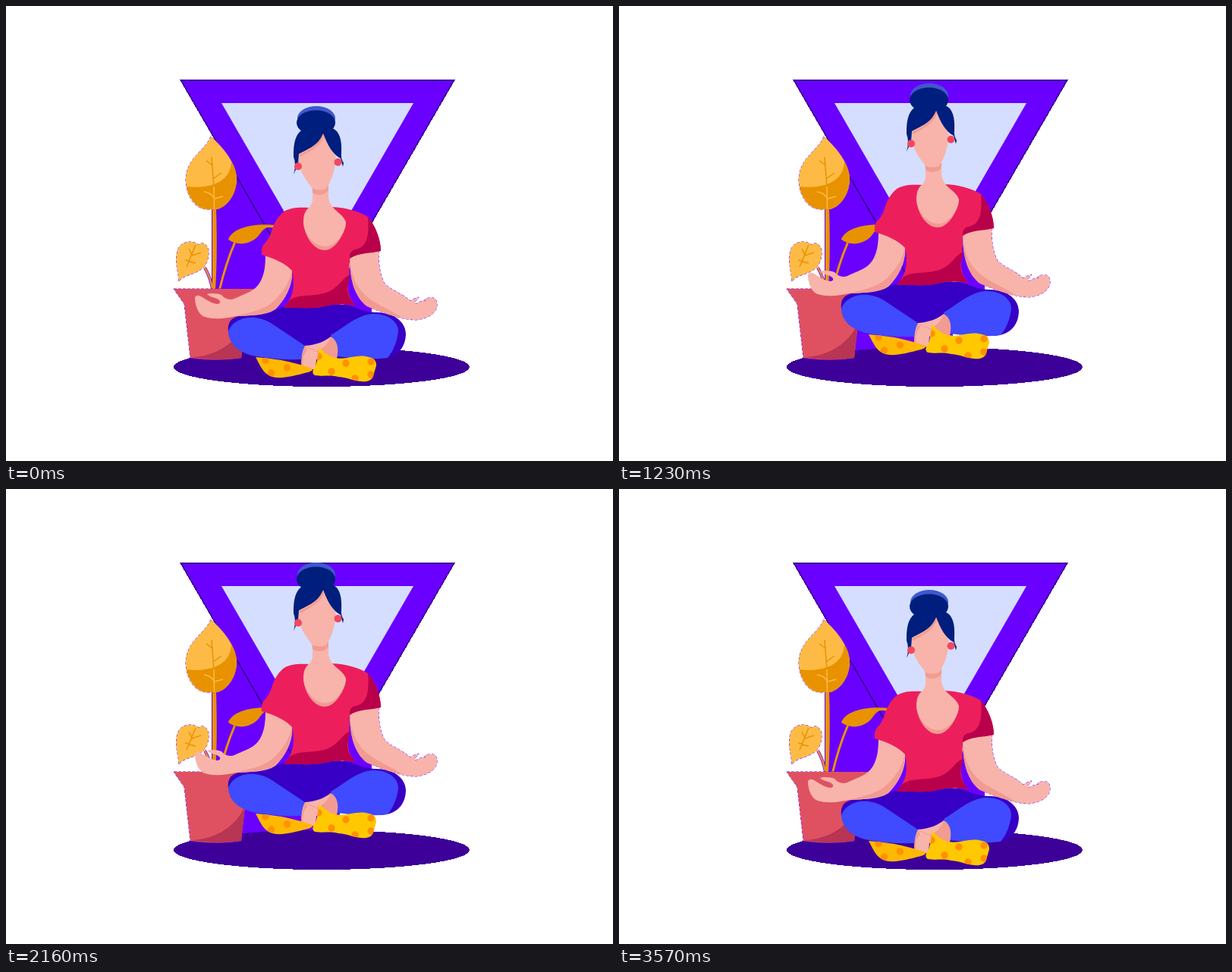
Write an HTML page that moves like this. It is 800 px wide and 600 px high and loops after 3.6 s.

```html
<!DOCTYPE html>
<html lang="en">
<head>
<meta charset="utf-8">
<title>Levitating meditation</title>
<style>
  html, body { margin: 0; width: 100%; height: 100%; overflow: hidden; background: #fff; }
  svg { display: block; width: 800px; height: 600px; }
  .purple { fill: #6a00ff; }
  .skin { fill: #f8b4aa; }
  .skin-shade { fill: #f19b91; }
  .shirt { fill: #ec1f5c; }
  .shirt-shade { fill: #b9004a; }
  .pants { fill: #3700c4; }
  .leg { fill: #404aff; }
  .hair { fill: #001e7d; }
  .gold { fill: #fdbb45; }
  .ochre { fill: #e89200; }
  .dots { fill: #ff9000; }
  .fringe { stroke: #6a00ff; stroke-width: 1; stroke-dasharray: 4 2; paint-order: stroke; }
  .line { fill: none; stroke: #e89200; stroke-width: 1.5; }
  .line.light { stroke: #fdbb45; }
</style>
</head>
<body>
<svg viewBox="0 0 800 600">
  <defs>
    <clipPath id="backSock"><path id="backSockShape" d="M329 463Q360 465 388 473L404 478Q405 481 398 483C382 487 368 491 356 490C340 488 336 476 329 463Z"/></clipPath>
    <clipPath id="frontSock"><path id="frontSockShape" d="M413 450C419 456 424 462 434 464C450 467 463 458 478 463C486 464 488 469 488 474L484 488C482 494 476 496 468 495C456 494 451 490 438 489C425 486 420 489 407 487Q403 485 405 479C411 473 410 462 413 450Z"/></clipPath>
  </defs>

  <!-- backdrop -->
  <path class="purple" d="M271 235L300 213L410 400L440 370V456H271Z"/>
  <g shape-rendering="crispEdges">
    <path class="purple" d="M230.500 98H590.500L410.500 409Z" stroke="#3a0099" stroke-width="1.700"/>
    <ellipse cx="416" cy="476" rx="195" ry="26" fill="#3d0099"/>
  </g>
  <path d="M284 128H537L410.500 347Z" fill="#d5defe"/>

  <!-- plant -->
  <path class="line" d="M262 345Q269 357 272 373" style="stroke:#6a00ff;stroke-width:4"/>
  <path class="line" d="M262 345Q269 357 272 373" style="stroke:#e8873c;stroke-width:2.500"/>
  <path class="ochre" d="M272 240H276Q279.500 320 276 374H272Z"/>
  <path class="line" d="M301.500 312Q289.500 340 281.500 374" style="stroke-width:3"/>
  <path class="ochre" d="M293 308C298 293 325 286 356 289V294C345 290 341 292 335 300C325 315 305 317 293 308Z"/>
  <path class="gold fringe" d="M270 172C263 191 237 200 237 230C238 252 250 270 269 268C289 272 305 248 304 226C302 203 282 183 270 172Z"/>
  <path class="ochre" d="M238 238C262 241 296 236 297 205Q303 214 304 226C305 248 289 272 269 268C254 270 241 254 238 238Z"/>
  <path class="line" d="M271 199L274 239M264 204L272 210M284 220L273 228"/>
  <path class="line light" d="M274 238L274.500 268M261 245Q270 246 274 253M286 251L275 254"/>
  <path class="gold fringe" d="M228 363C227 348 222 337 226 323C229 310 246 308 254 315C260 309 268 317 267 326C266 357 236 350 228 363Z"/>
  <path class="line" d="M250 315L238 344M241 320L245 328M257 325L245 329M236 335L241 336M250 339L241 337"/>
  <path class="fringe" fill="#df5161" d="M221 373H331L318 393L310 464Q278 469 243 464L235 393Z"/>
  <path fill="#b83553" d="M244 463C280 462 306 441 315 417L310 464Q278 469 244 463Z"/>

  <g id="figure">
    <!-- trousers -->
    <path class="purple" d="M448 345H456L482 398V406L445 398Z"/>
    <path class="pants" d="M293 430C291 410 304 407 330 408C352 404 360 394 380 396C405 400 430 390 452 395C464 398 471 404 490 404C514 405 527 418 527 433C526 455 511 465 492 465L430 452L394 449L330 452Z"/>
    <path class="leg" d="M293 430C298 412 325 404 349 418L394 448L389 466Q355 467 330 462C307 458 294 446 293 430Z"/>
    <path class="leg" d="M428 434C446 424 462 407 484 406C505 406 517 417 517 429C515 447 508 458 503 464C480 467 453 464 435 462Z"/>

    <!-- feet -->
    <path class="skin" d="M394 448C410 447 420 442 428 436L432 466H409L408 479H389C389 464 390 456 394 448Z"/>
    <path class="skin-shade" d="M428 436C437 441 439 451 436 465L424 464L409 456Q424 449 428 436ZM394 449Q389 460 389 478H392Q389 461 397 454Z"/>
    <path class="line" d="M394 449L413 457" style="stroke:#f19b91;stroke-width:1"/>
    <use href="#backSockShape" fill="#ffb800"/>
    <g class="dots" clip-path="url(#backSock)">
      <circle cx="342" cy="467" r="4.700"/><circle cx="349.500" cy="484" r="4.700"/><circle cx="370.500" cy="477" r="4.700"/>
    </g>
    <use href="#frontSockShape" fill="#ffc800"/>
    <g class="dots" clip-path="url(#frontSock)">
      <circle cx="412" cy="462" r="4.700"/><circle cx="448" cy="471" r="4.700"/><circle cx="429" cy="482" r="4.700"/>
      <circle cx="460" cy="491" r="4.700"/><circle cx="481" cy="469" r="4.700"/><circle cx="481" cy="486" r="4.700"/>
    </g>

    <!-- arms -->
    <path class="skin" d="M342 326L377 346C379 366 370 385 355 400C342 409 320 408 303 409C290 412 275 414 262 410C253 407 249 394 249 384Q252 380 257 383C265 388 271 392 278 393Q283 393 282 389C279 384 269 385 265 380C270 378 280 379 284 381C289 387 295 388 301 386C318 378 329 376 336 362C341 352 342 341 342 326Z"/>
    <path class="skin-shade" d="M377 349C378 370 367 389 351 402Q338 408 303 409C326 403 344 400 357 385C368 373 373 364 377 349Z"/>
    <path class="skin fringe" d="M453 330C453 362 460 384 476 396C496 404 517 413 540 414C558 412 568 404 568 394C568 387 565 384 559 385Q552 385 552 388L558 389Q549 387 540 393C537 390 542 388 544 384Q537 386 533 389C519 377 509 376 499 366C492 353 491 340 491 320Z"/>
    <path class="skin-shade" d="M453 331C455 358 463 375 482 388C496 397 511 403 523 412C506 408 490 402 476 396C460 384 453 362 453 331Z"/>

    <!-- shirt -->
    <path class="shirt" d="M400 266C386 265 375 266 368 270C360 275 355 284 352 291C348 304 345 309 339 315Q336 321 337 328C354 333 368 339 377 349C380 365 381 382 366 398C383 396 395 400 415 397C435 392 448 393 460 395C448 379 451 371 452 356L453 333C462 325 478 326 494 323C494 308 487 290 477 278C464 270 448 266 430 265Z"/>
    <path class="shirt-shade" d="M477 278C487 290 494 308 494 323C477 327 465 325 453 333Q452 323 460 321C476 319 479 302 477 278ZM454 354C441 360 440 371 422 378C403 384 386 379 374 388L366 398C383 396 395 400 415 397C435 392 448 393 461 395C447 380 449 374 454 354Z"/>

    <!-- neck and face -->
    <path class="skin-shade" d="M392 285C393 303 405 322 420 322C433 322 446 303 448 285Z"/>
    <path class="skin" d="M404 236V256C402 269 392 264 392 286C394 303 407 317 421 317C434 317 448 300 448 285C444 272 427 270 425 252V232Z"/>
    <path class="skin-shade" d="M403 238L425 234V242Q422 249 413 249Q407 249 404 246Z"/>
    <path class="skin" d="M419 165L390 188C384 196 385 206 388 215C392 226 399 234 404 241Q414 244 422 241C428 232 433 220 435 200Z"/>

    <!-- hair -->
    <ellipse cx="409" cy="148" rx="25" ry="16" fill="#4057cf"/>
    <ellipse class="hair" cx="408.500" cy="154" rx="25.500" ry="16.500"/>
    <path class="hair" d="M391 163C379 170 379 188 379 199Q383 209 379 222L385 209L386 195C397 189 412 184 418 168C424 184 431 196 441 201L444 212L445 207Q441 201 442 194C443 178 440 165 430 161Z"/>
    <path class="skin-shade" d="M386 196C398 191 413 183 418 168L419 171C415 185 400 192 388 199Z"/>
    <circle cx="385" cy="211.500" r="5" fill="#f3485f"/>
    <circle cx="437.500" cy="206" r="5" fill="#f3485f"/>
  </g>
</svg>
<script>
  const LOOP = 3600, STEP = 30;
  const figure = document.getElementById('figure');

  // Steady rise and slightly faster fall, snapped to whole pixels.
  function draw() {
    const n = Math.floor(performance.now() % LOOP / STEP);
    const y = Math.round(Math.max(0.21 - 0.74 * n, 0.75 * n - 88.55));
    figure.setAttribute('transform', `translate(0 ${y})`);
    requestAnimationFrame(draw);
  }
  draw();
</script>
</body>
</html>
```
